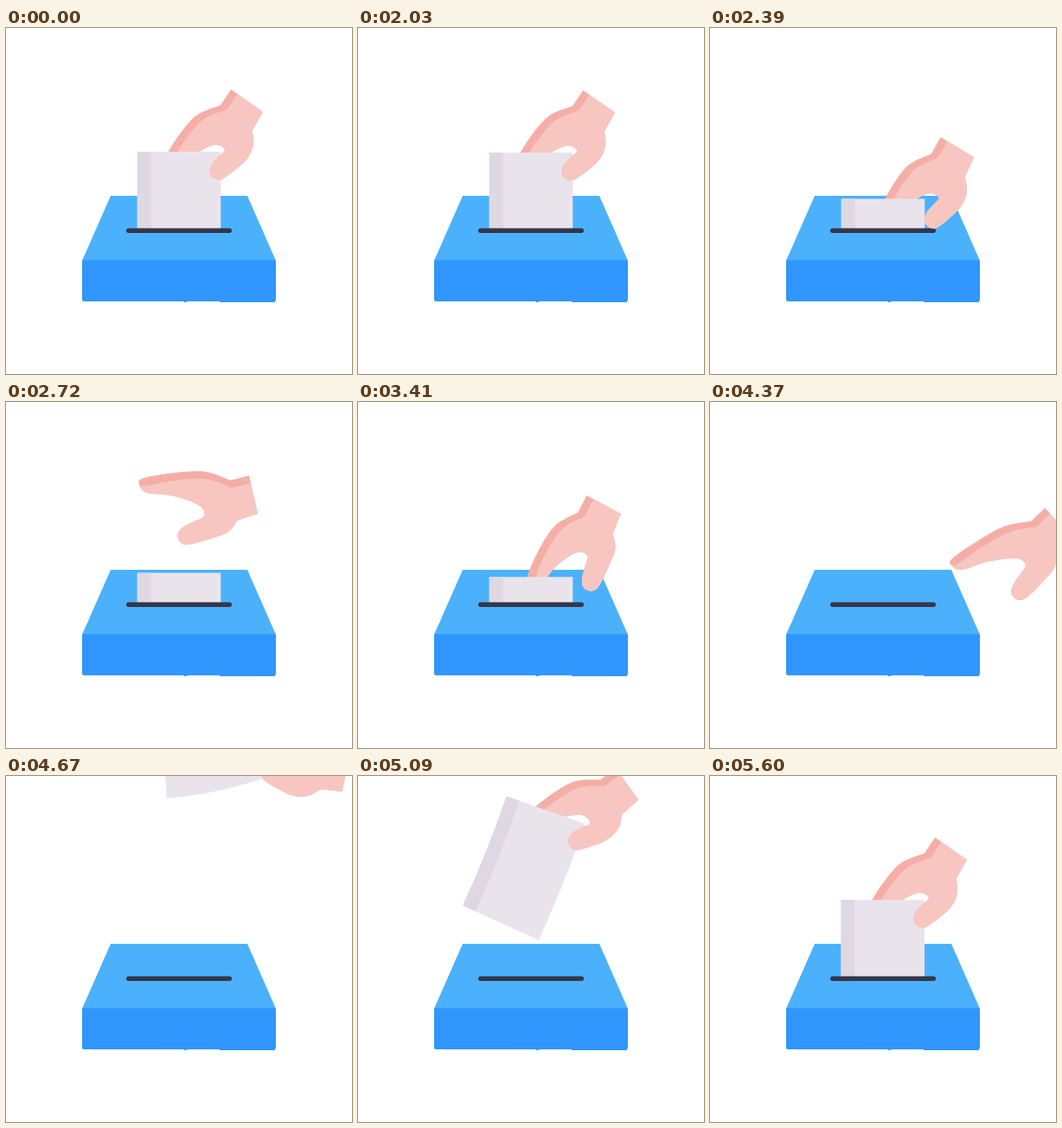
Recreate the animation shown at these times as an HTML page with a canvas. Size 400 px wide and 400 px high, loop 5660 ms.

```html
<!DOCTYPE html>
<html lang="en">
<head>
<meta charset="utf-8">
<title>Casting a ballot</title>
<style>
html, body { margin: 0; width: 100%; height: 100%; overflow: hidden; background: #fff; }
canvas { display: block; width: 400px; height: 400px; }
</style>
</head>
<body>
<canvas id="stage" width="400" height="400"></canvas>
<script>
const ctx = document.getElementById('stage').getContext('2d');
const LOOP = 5660, REST_END = 2030, RETURN = 4561;
const SKIN = '#f8c6c0', SHADE = '#f4aea6', SHEET = '#e9e4ec', FOLD = '#dfd8e3';
const TOP = '#4bb1fd', FRONT = '#3097fe', SLOT = '#35364b';
const SLOT_Y = 234.2, SHEET_TOP = 143, SHEET_RIGHT = 248.3;
const SHEET_W = 96.5, SHEET_H = 145, FOLD_W = 16;

// Hand outline: x runs from the wrist to the fingers, y towards the back of the hand.
const WRIST = 22.5, SHADE_W = 9, HEADING = 125;
const KNUCKLE = [65, 25], THUMB_JOINT = [50, -25], HOLD = [66, -9];
const back = [[22, 22], [49, 38.5]];
const fingerBack = [[87, 45.5], [120, 47]];
const fingertip = [[126, 42], [120, 30], [91, 19.5]];
const palm = [[64, 2], [62, -12.3]];
const thumb = [[85, -17.5], [95, -24], [95, -34], [86, -39.5]];
const heel = [[58, -38.5], [38, -35.5], [25, -25]];

const pinch = { curl: -10, squeeze: 15.5 };
const open = { curl: 0, squeeze: 0 };
const point = { curl: -10, squeeze: 0 };
const reach = { curl: 5, squeeze: 0 };

const key = (t, x, y, turn, grip) => ({ t, x, y, turn, ...grip });
const keys = [
  key(2000, 278.5, 84, 0, pinch),
  key(2400, 286, 138, -4, pinch),
  key(2720, 286, 107, 42, open),
  key(3150, 283, 97, -6, point),
  key(3600, 286, 132, -7, point),
  key(4040, 306, 114.5, 18.4, reach),
  key(4280, 343, 120, 20, reach),
  key(4560, 540, 190, -10, reach),
  key(RETURN, 450, -80, 80, pinch),
  key(4670, 393.5, -4, 67, pinch),
  key(4990, 333, 0, 32, pinch),
  key(5300, 278.5, 46, 0, pinch),
  key(5560, 278.5, 84, 0, pinch)
];

const radians = degrees => degrees * Math.PI / 180;
const clamp = u => Math.max(0, Math.min(1, u));
function ease(t, from, to) {
  const u = clamp((t - from) / (to - from));
  return u * u * (3 - 2 * u);
}

// Smooth curve through the keys that never overshoots them.
function sample(t, name) {
  let i = 0;
  while (i < keys.length - 2 && t >= keys[i + 1].t) i++;
  const a = keys[i], b = keys[i + 1], span = b.t - a.t;
  const rate = j => (keys[j + 1][name] - keys[j][name]) / (keys[j + 1].t - keys[j].t);
  const slope = j => {
    if (j === 0 || j === keys.length - 1) return 0;
    const p = rate(j - 1), q = rate(j);
    return p * q > 0 ? 2 * p * q / (p + q) : 0;
  };
  const u = clamp((t - a.t) / span), v = 1 - u;
  return a[name] + (b[name] - a[name]) * u * u * (3 - 2 * u)
    + span * u * v * (slope(i) * v - slope(i + 1) * u);
}

function handAt(t) {
  const hand = {};
  for (const name of ['x', 'y', 'turn', 'curl', 'squeeze']) hand[name] = sample(t, name);
  return hand;
}

function swing(pts, [px, py], degrees) {
  const c = Math.cos(radians(degrees)), s = Math.sin(radians(degrees));
  return pts.map(([x, y]) => [
    px + (x - px) * c - (y - py) * s,
    py + (x - px) * s + (y - py) * c
  ]);
}

function place(x, y, degrees) {
  ctx.translate(x, y);
  ctx.rotate(radians(degrees));
}

function spline(pts) {
  ctx.lineTo(...pts[0]);
  for (let i = 0; i < pts.length - 1; i++) {
    const a = pts[i], b = pts[i + 1], before = pts[i - 1] || a, after = pts[i + 2] || b;
    ctx.bezierCurveTo(
      a[0] + (b[0] - before[0]) / 6, a[1] + (b[1] - before[1]) / 6,
      b[0] - (after[0] - a[0]) / 6, b[1] - (after[1] - a[1]) / 6, b[0], b[1]);
  }
}

function fillOutline(color, curve, ...corners) {
  ctx.fillStyle = color;
  ctx.beginPath();
  spline(curve);
  corners.forEach(p => ctx.lineTo(...p));
  ctx.closePath();
  ctx.fill();
}

function drawHand(hand, thumbOnly) {
  const upper = [...back, ...swing(fingerBack, KNUCKLE, hand.curl)];
  const tip = swing(fingertip, KNUCKLE, hand.curl);
  const lower = [palm[1], ...swing(thumb, THUMB_JOINT, hand.squeeze), ...heel];
  const round = [...tip, palm[0], ...lower];
  ctx.save();
  place(hand.x, hand.y, HEADING + hand.turn);
  if (thumbOnly) {
    fillOutline(SKIN, lower);
  } else {
    const edge = upper.map(([x, y]) => [x, y - SHADE_W]);
    fillOutline(SHADE, [...upper, ...round], [0, -WRIST], [0, WRIST]);
    fillOutline(SKIN, [...edge, ...round], [0, -WRIST], [0, WRIST - SHADE_W]);
  }
  ctx.restore();
}

function fillSheet(color, left, right, bend) {
  const c = Math.cos(bend), s = Math.sin(bend);
  const endX = -SHEET_H * Math.sin(bend / 2), endY = SHEET_H * Math.cos(bend / 2);
  ctx.fillStyle = color;
  ctx.beginPath();
  ctx.moveTo(-right, 0);
  ctx.quadraticCurveTo(-right, SHEET_H / 2, endX - right * c, endY - right * s);
  ctx.lineTo(endX - left * c, endY - left * s);
  ctx.quadraticCurveTo(-left, SHEET_H / 2, -left, 0);
  ctx.closePath();
  ctx.fill();
}

// The sheet hangs from the hand on the way in, then drops in two pushes.
function drawSheet(t, hand) {
  const carried = t >= RETURN, bend = carried ? radians(hand.turn * 0.28) : 0;
  ctx.save();
  ctx.beginPath();
  ctx.rect(0, 0, 400, SLOT_Y);
  ctx.clip();
  if (carried) {
    const [[dx, dy]] = swing([HOLD], [0, 0], HEADING + hand.turn);
    place(hand.x + dx, hand.y + dy, hand.turn);
  } else {
    const drop = 54.5 * ease(t, 2000, 2400) + 39 * ease(t, 3370, 3560);
    ctx.translate(SHEET_RIGHT, SHEET_TOP + drop);
  }
  fillSheet(SHEET, SHEET_W, 0, bend);
  fillSheet(FOLD, SHEET_W, SHEET_W - FOLD_W, bend);
  ctx.restore();
}

function drawBox() {
  ctx.fillStyle = TOP;
  ctx.beginPath();
  ctx.moveTo(121, 194);
  ctx.lineTo(279, 194);
  ctx.lineTo(312, 269);
  ctx.lineTo(88, 269);
  ctx.fill();
  ctx.fillStyle = FRONT;
  ctx.beginPath();
  ctx.roundRect(88, 268.5, 224, 47.5, [0, 0, 2, 2]);
  ctx.fill();
  ctx.fillRect(247, 315, 64, 2);
  ctx.fillRect(206, 315, 3, 2);
}

function drawSlot() {
  ctx.strokeStyle = SLOT;
  ctx.lineWidth = 5.5;
  ctx.lineCap = 'round';
  ctx.beginPath();
  ctx.moveTo(141.7, SLOT_Y);
  ctx.lineTo(258.3, SLOT_Y);
  ctx.stroke();
}

function draw(now) {
  const clock = now % LOOP, t = clock < REST_END ? 0 : clock;
  const hand = handAt(t);
  ctx.fillStyle = '#fff';
  ctx.fillRect(0, 0, 400, 400);
  drawBox();
  drawHand(hand, false);
  drawSheet(t, hand);
  drawSlot();
  drawHand(hand, true);
}

const start = performance.now();
function tick() {
  draw(performance.now() - start);
  requestAnimationFrame(tick);
}
tick();
</script>
</body>
</html>
```
